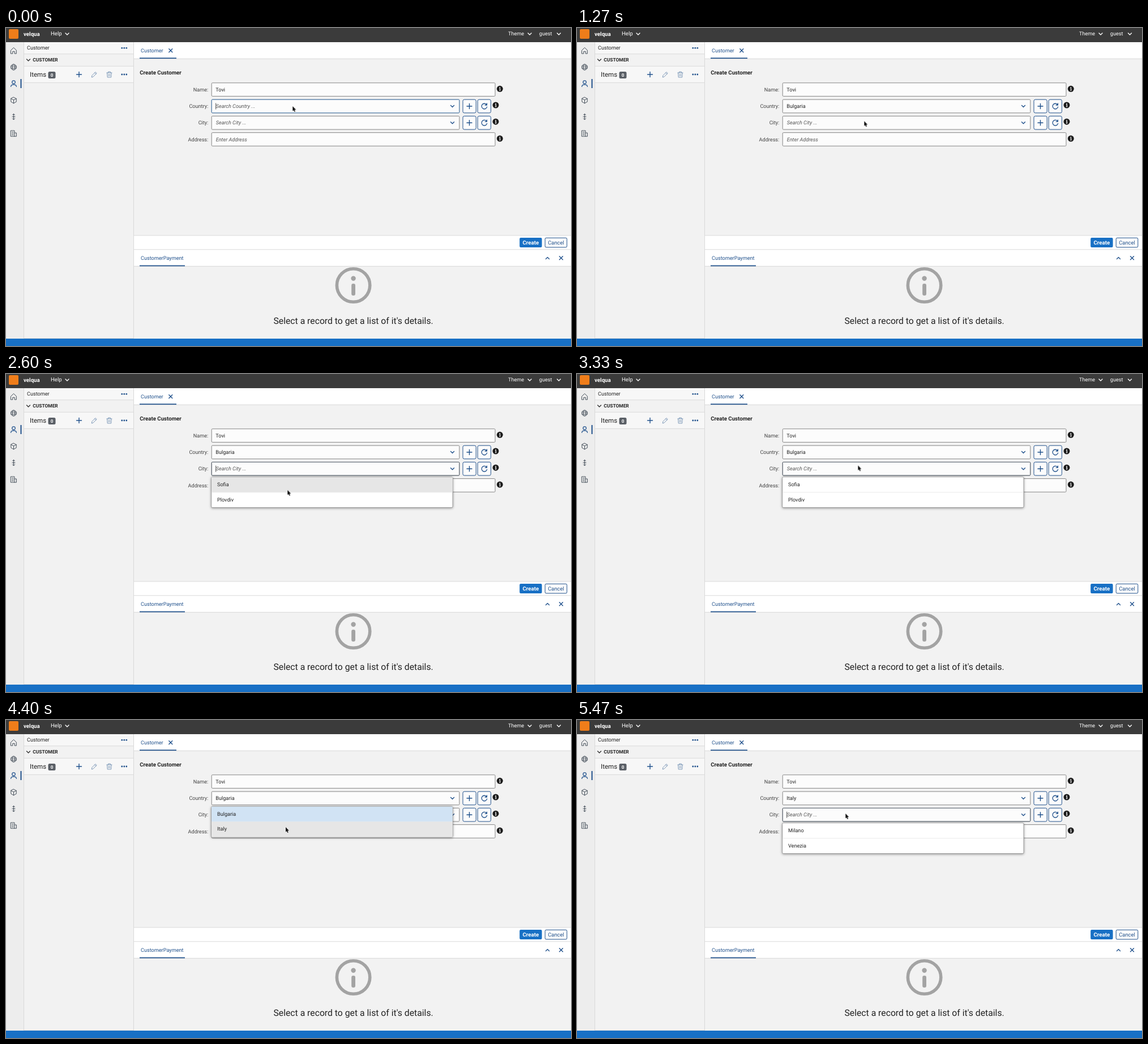
An HTML page for the animation above (5.54 s loop, 998 px wide and 561 px high).

```html
<!DOCTYPE html>
<html lang="en">
<head>
<meta charset="utf-8">
<title>Create Customer</title>
<style>
html, body { margin: 0; width: 100%; height: 100%; overflow: hidden; background: #f2f2f2; }
svg { display: block; width: 100vw; height: 100vh; }
text { font: 9.15px Roboto, "Liberation Sans", sans-serif; fill: #1d2d3e; fill: #222; text-rendering: geometricPrecision; }
.b { font-weight: 700; font-size: 9.7px; }
.lab text { text-anchor: end; fill: #444; }
.ph { font-style: italic; fill: #555; }
.w, .bar text { fill: #fff; }
.blue { fill: #20518c; }
.line { fill: none; stroke-linecap: round; stroke-linejoin: round; }
.rule { stroke: #d9d9d9; fill: none; }
.field { fill: #fcfcfc; stroke: #858585; }
.btn { fill: #fcfcfc; stroke: #20518c; }
.pop { fill: #fff; stroke: #8c8c8c; stroke-width: .8; filter: drop-shadow(0 1px 2px #0006); }
.hover { fill: #e6e6e6; }
.picked { fill: #d1e3f4; }
.press { fill: #385f92; }
.caret { stroke: #222; stroke-width: .8; }

.k { animation: 5.54s step-end infinite; }
.noCountry { animation-name: noCountry; }
.bulgaria { animation-name: bulgaria; }
.italy { animation-name: italy; }
.focus { animation-name: focus; }
.caretA { animation-name: caretA; }
.caretB { animation-name: caretB; }
.caretC { animation-name: caretC; }
.countries { animation-name: countries; }
.overB { animation-name: overB; }
.pressB { animation-name: pressB; }
.overI { animation-name: overI; }
.pressI { animation-name: pressI; }
.cities { animation-name: cities; }
.overS { animation-name: overS; }
.first { animation-name: first; }
.second { animation-name: second; }
.cursor { animation-name: cursor; }

@keyframes noCountry { 0% { opacity: 1 } 18.04%, 100% { opacity: 0 } }
@keyframes bulgaria { 0% { opacity: 0 } 18.04% { opacity: 1 } 83.03%, 100% { opacity: 0 } }
@keyframes italy { 0% { opacity: 0 } 83.03%, 100% { opacity: 1 } }
@keyframes focus { 0% { opacity: 1 } 3.6%, 100% { opacity: 0 } }
@keyframes caretA { 0% { opacity: 1 } 9.62%, 100% { opacity: 0 } }
@keyframes caretB { 0% { opacity: 0 } 64.97% { opacity: 1 } 74.54%, 100% { opacity: 0 } }
@keyframes caretC {
  0% { opacity: 0 } 28.87% { opacity: 1 } 33.6% { opacity: 0 }
  43.31% { opacity: 1 } 51.73% { opacity: 0 } 92.59%, 100% { opacity: 1 }
}
@keyframes countries {
  0% { opacity: 0 } 3.6% { opacity: 1 } 18.04% { opacity: 0 }
  64.97% { opacity: 1 } 83.03%, 100% { opacity: 0 }
}
@keyframes overB { 0% { opacity: 0 } 12.09% { opacity: 1 } 18.04%, 100% { opacity: 0 } }
@keyframes pressB { 0% { opacity: 0 } 14.43% { opacity: 1 } 18.04%, 100% { opacity: 0 } }
@keyframes overI { 0% { opacity: 0 } 74.54% { opacity: 1 } 83.03%, 100% { opacity: 0 } }
@keyframes pressI { 0% { opacity: 0 } 80.68% { opacity: 1 } 83.03%, 100% { opacity: 0 } }
@keyframes cities {
  0% { opacity: 0 } 28.87% { opacity: 1 } 62.63% { opacity: 0 } 92.59%, 100% { opacity: 1 }
}
@keyframes overS { 0% { opacity: 0 } 37.36% { opacity: 1 } 55.35%, 100% { opacity: 0 } }
@keyframes first { 0% { opacity: 1 } 83.03%, 100% { opacity: 0 } }
@keyframes second { 0% { opacity: 0 } 83.03%, 100% { opacity: 1 } }
@keyframes cursor {
  0% { transform: translate(506.3px, 138px) }
  4.87% { transform: translate(506.3px, 138px); animation-timing-function: steps(8) }
  14.43% { transform: translate(513px, 160.7px) }
  18.04% { transform: translate(513px, 160.7px); animation-timing-function: steps(7) }
  26.53% { transform: translate(503px, 167px) }
  32.49% { transform: translate(503px, 167px); animation-timing-function: steps(2) }
  34.83% { transform: translate(500.3px, 184px); animation-timing-function: steps(10) }
  46.92% { transform: translate(497.3px, 204.8px); animation-timing-function: steps(3) }
  50.54% { transform: translate(497px, 206px) }
  54.15% { transform: translate(497px, 206px); animation-timing-function: steps(6) }
  61.37% { transform: translate(496px, 139px) }
  64.97% { transform: translate(496px, 139px); animation-timing-function: steps(5) }
  70.93% { transform: translate(494.3px, 156.8px); animation-timing-function: steps(6) }
  78.15% { transform: translate(494px, 189px) }
  83.03% { transform: translate(494px, 189px); animation-timing-function: steps(2) }
  85.37% { transform: translate(493.3px, 180.5px); animation-timing-function: steps(6) }
  92.59%, 100% { transform: translate(474.3px, 165px) }
}
</style>
</head>
<body>
<svg viewBox="0 0 998 561" preserveAspectRatio="none">
  <defs>
    <path id="down" class="line" d="M-3-1.5 0 1.5 3-1.5" stroke-width="1.4"/>
    <path id="cross" class="line" d="M-3-3 3 3M3-3-3 3" stroke-width="1.4"/>
    <path id="plus" class="line" d="M-4.5 0H4.5M0-4.5V4.5" stroke-width="1.4"/>
    <g id="dots" fill="#20518c"><circle cx="-4" r="1.4"/><circle r="1.4"/><circle cx="4" r="1.4"/></g>
    <g id="info">
      <circle r="5.5" fill="#1c1c1c"/>
      <circle cy="-2.4" r=".9" fill="#fff"/>
      <path d="M-.9-.6H.4V2.5M-1.2 2.7H1.3" fill="none" stroke="#fff" stroke-width="1.1"/>
    </g>
    <g id="lookup">
      <rect class="field" x="363.2" y="-11.8" width="437.6" height="23.6" rx="1.5"/>
      <use href="#down" x="788.5" stroke="#20518c"/>
      <rect class="btn" x="807" y="-11.8" width="23.2" height="23.6" rx="2.5"/>
      <rect class="btn" x="833.2" y="-11.8" width="23.2" height="23.6" rx="2.5"/>
      <use href="#plus" x="818.5" stroke="#20518c"/>
      <g class="line" stroke="#20518c" stroke-width="1.3">
        <path d="M848.5-3.2A4.8 4.8 0 1 0 849.6 1.2M849.4-5V-2H846.2"/>
      </g>
      <use href="#info" x="865" y="-2"/>
    </g>
    <g id="wide">
      <rect class="field" x="363.2" y="-11.8" width="500.8" height="23.6" rx="1.5"/>
      <use href="#info" x="872.3" y="-1.3"/>
    </g>
    <rect id="menu" class="pop" x="362.7" y="-.3" width="426.3" height="54" rx="2"/>
    <rect id="row" x="363.2" width="425.4" height="26.6"/>
    <path id="split" d="M363 26.8H788.6" stroke="#e2e2e2" stroke-width=".7"/>
  </defs>

  <rect width="998" height="561" fill="#f2f2f2"/>

  <!-- top bar -->
  <g class="bar">
    <rect width="998" height="25" fill="#3b3b3b"/>
    <rect x="5" y="2" width="17" height="17" rx="2" fill="#ef7d1a"/>
    <text class="b" x="31" y="13.5">velqua</text>
    <text x="79" y="13.4" style="font-size:9.6px">Help</text>
    <text x="887" y="13.4">Theme</text>
    <text x="941.8" y="13.4">guest</text>
    <g stroke="#fff">
      <use href="#down" x="108" y="10.5"/><use href="#down" x="925" y="10.5"/><use href="#down" x="976.5" y="10.5"/>
    </g>
  </g>

  <!-- icon rail -->
  <rect y="25" width="31.5" height="523" fill="#ededed"/>
  <g class="line" stroke="#46505b" stroke-width="1">
    <path d="M8.7 39.2 13.5 34.6 18.3 39.2V45.2H15.2V41.4H11.8V45.2H8.7Z"/>
    <circle cx="13.5" cy="69" r="5"/><ellipse cx="13.5" cy="69" rx="2.3" ry="5"/>
    <path d="M8.8 67.2H18.2M8.8 70.8H18.2"/>
    <g stroke="#20518c" stroke-width="1.2"><circle cx="13.5" cy="95.6" r="2.8"/><path d="M8.6 103.4C8.8 98.6 18.2 98.6 18.4 103.4"/></g>
    <path d="M13.5 122.2 18.2 124.6V130.2L13.5 132.8 8.8 130.2V124.6ZM8.8 124.6 13.5 127 18.2 124.6M13.5 127V132.8"/>
    <path d="M13.5 152V161M11.5 153.5 13.5 151.3 15.5 153.5M11.5 159.7 13.5 162 15.5 159.7M11 156.6H16"/>
    <path d="M8.7 181H15V191.2H8.7ZM15 185H18.4V191.2H15M10.6 183.7H13M10.6 186.2H13M10.6 188.7H13"/>
  </g>
  <rect x="25.5" y="90" width="2" height="16" fill="#20518c"/>

  <!-- sidebar -->
  <rect x="32" y="25" width="193" height="21" fill="#f7f7f7"/>
  <rect x="32" y="67" width="193" height="29" fill="#f7f7f7"/>
  <path class="rule" d="M31.5 25V548M225.5 25V548M32 45.8H225M32 67.3H225M32 96.4H225M32 547.5H225"/>
  <text x="37" y="38.3">Customer</text>
  <use href="#dots" x="208.8" y="35.3"/>
  <use href="#down" x="39.5" y="56.5" stroke="#333"/>
  <text class="b" x="47.3" y="59.4" style="font-size:8.4px">CUSTOMER</text>
  <text x="42" y="86" style="font-size:11.6px">Items</text>
  <rect x="74.5" y="77" width="13" height="12" rx="2.5" fill="#5a5f66"/>
  <text class="b w" x="81" y="86" text-anchor="middle" style="font-size:8px">0</text>
  <use href="#plus" x="129" y="82" stroke="#20518c"/>
  <g class="line" stroke="#7f9ab9">
    <path d="M151.3 86.6 152 83.6 158 77.6 160.2 79.8 154.2 85.9ZM156.6 79 158.8 81.2"/>
    <path d="M177.8 79H187M180.5 79V77.2H184.4V79M178.7 79.2 179.2 87H185.7L186.2 79.2M181.2 81.4V84.8M183.6 81.4V84.8"/>
  </g>
  <use href="#dots" x="208.8" y="82"/>

  <!-- form -->
  <rect x="226" y="25" width="772" height="29" fill="#fff"/>
  <path class="rule" d="M226 54.3H998"/>
  <text class="blue" x="238" y="42.8">Customer</text>
  <use href="#cross" x="290.8" y="39.7" stroke="#20518c"/>
  <rect x="236" y="52.4" width="65" height="1.7" fill="#20518c"/>
  <text class="b" x="236.2" y="82.4">Create Customer</text>
  <g class="lab">
    <text x="357.3" y="111.7">Name:</text>
    <text x="357.3" y="141">Country:</text>
    <text x="357.3" y="170.3">City:</text>
    <text x="357.3" y="199.5">Address:</text>
  </g>
  <use href="#wide" y="108.6"/>
  <use href="#lookup" y="138"/>
  <use href="#lookup" y="167.2"/>
  <use href="#wide" y="196.4"/>
  <rect class="k focus" x="363.2" y="126.2" width="437.6" height="23.6" rx="1.5" fill="none" stroke="#4f86bd"/>
  <text x="370.3" y="111.6">Tovi</text>
  <text class="ph k noCountry" x="370.7" y="141">Search Country ...</text>
  <text class="k bulgaria" x="370.3" y="141">Bulgaria</text>
  <text class="k italy" x="370.3" y="141">Italy</text>
  <text class="ph" x="370.7" y="170.3">Search City ...</text>
  <text class="ph" x="370.7" y="199.5">Enter Address</text>
  <path class="caret k caretA" d="M370.7 132.5V143.5"/>
  <path class="caret k caretB" d="M404.3 132.5V143.5"/>

  <!-- footer and detail pane -->
  <rect x="226" y="366" width="772" height="54" fill="#fff"/>
  <path class="rule" d="M226 366H998M226 390.8H998M226 420.3H998"/>
  <rect x="907.2" y="370" width="39.4" height="17" rx="2" fill="#1870c5"/>
  <text class="b w" x="926.9" y="381.8" text-anchor="middle">Create</text>
  <rect class="btn" x="952.2" y="370.3" width="38.6" height="16.6" rx="2"/>
  <text class="blue" x="971.5" y="381.8" text-anchor="middle" style="font-size:9.4px">Cancel</text>
  <text class="blue" x="238" y="408.9">CustomerPayment</text>
  <rect x="236" y="418.6" width="80" height="1.7" fill="#20518c"/>
  <use href="#down" transform="translate(956.5 406) scale(1 -1)" stroke="#20518c"/>
  <use href="#cross" x="980.5" y="405.8" stroke="#20518c"/>
  <circle cx="613.6" cy="454" r="29.2" fill="none" stroke="#a3a3a3" stroke-width="5.6"/>
  <circle cx="613.6" cy="441.8" r="4.2" fill="#a3a3a3"/>
  <rect x="610.2" y="451" width="6.8" height="21" rx="3" fill="#a3a3a3"/>
  <text x="613.6" y="521.8" text-anchor="middle" style="font-size:15.75px">Select a record to get a list of it's details.</text>
  <rect y="548" width="998" height="13" fill="#1870c5"/>

  <!-- country list -->
  <g class="k countries">
    <use href="#menu" y="152.7"/>
    <use href="#row" y="152.9" class="picked k bulgaria"/>
    <use href="#row" y="152.9" class="hover k overB"/>
    <use href="#row" y="179.5" class="hover k overI"/>
    <use href="#split" y="152.7"/>
    <text x="373" y="168.7">Bulgaria</text>
    <text x="373" y="195.4">Italy</text>
    <g class="k pressB">
      <use href="#row" y="152.9" class="press"/>
      <rect x="364.4" y="154.1" width="423" height="24.3" fill="none" stroke="#c7d5e6" stroke-width=".7" stroke-dasharray="1 1"/>
      <text class="w" x="373" y="168.7">Bulgaria</text>
    </g>
    <g class="k pressI">
      <use href="#row" y="179.5" class="press"/>
      <text class="w" x="373" y="195.4">Italy</text>
    </g>
  </g>

  <!-- city list -->
  <g class="k cities">
    <rect x="363.2" y="155.4" width="437.6" height="23.6" rx="1.5" fill="none" stroke="#5d6875"/>
    <use href="#menu" y="181.9"/>
    <use href="#row" y="182" class="hover k overS"/>
    <use href="#split" y="181.9"/>
    <g class="k first">
      <text x="373" y="198">Sofia</text>
      <text x="373" y="224.7">Plovdiv</text>
    </g>
    <g class="k second">
      <text x="373" y="198">Milano</text>
      <text x="373" y="224.7">Venezia</text>
    </g>
  </g>
  <path class="caret k caretC" d="M370.7 161.7V172.7"/>

  <path class="k cursor" d="M0 0V8.6L1.9 6.9 3.2 9.9 4.7 9.3 3.4 6.3H6Z" fill="#111" stroke="#fff" stroke-width=".8" paint-order="stroke"/>
</svg>
</body>
</html>
```
